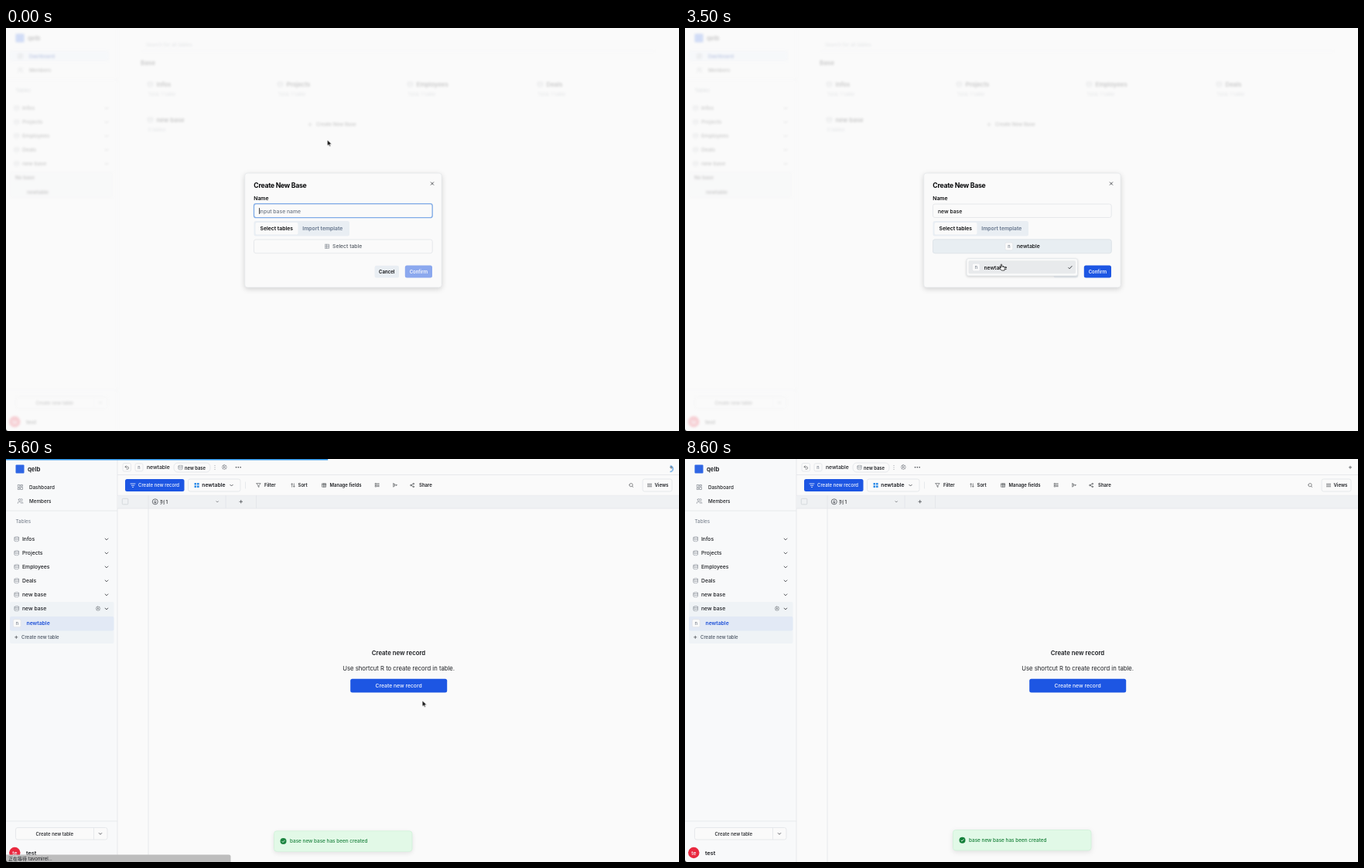
Write an HTML page that moves like this. It is 870 px wide and 522 px high and loops after 8.7 s.

```html
<!DOCTYPE html>
<html lang="en">
<head>
<meta charset="utf-8">
<title>Create New Base</title>
<style>
html, body { margin: 0; width: 100%; height: 100%; overflow: hidden; background: #fafafa; }
svg { display: block; width: 100%; height: 100%; color: #1d1f23; }
text { font: 500 6.8px Inter, "Noto Sans CJK SC", "Noto Sans CJK", sans-serif; dominant-baseline: central; fill: currentColor; white-space: pre; }
.s { font-size: 6px; }
.m { font-size: 6.3px; }
.b { font-weight: 600; }
.r { font-weight: 400; }
.mid { text-anchor: middle; }
.w { fill: #f4f7ff; }
.g { fill: #6d7683; }
.i { fill: none; stroke: #33363b; stroke-width: 2; stroke-linecap: round; stroke-linejoin: round; }
.gi { stroke: #7b818a; }
.box { fill: #fafafa; stroke: #e1e4e8; stroke-width: .8; }
.line { stroke: #e2e5e9; stroke-width: .8; fill: none; }
.blue { fill: #1d56e3; }

.k { animation: 8.7s step-end infinite; }
.fade { animation-timing-function: linear; }
#dash { opacity: .2; filter: blur(1.8px); }
#dash .g { opacity: .7; }
#dialog, #dash { color: #08090b; }
#dialog { animation-name: dialog; }
#page { animation-name: page; }
#ring { animation-name: ring; }
#hover { animation-name: hover; }
#pick { animation-name: pick; }
.chosen { animation-name: chosen; }
#popup { animation-name: popup; }
#press { animation-name: press; }
#toast { animation-name: toast; animation-timing-function: ease; }
#load { animation-name: load; }
#bar { animation-name: bar; animation-timing-function: ease-out; }
#spin { animation: spin .4s linear infinite; }
#status { animation-name: status; }
#cursor { animation-name: move; animation-timing-function: ease-in-out; }
#arrow { animation-name: arrow; }
#beam { animation-name: beam; }
#hand { animation-name: hand; }

@keyframes dialog { 0%, 63.218% { opacity: 1 } 64.368%, 100% { opacity: 0 } }
@keyframes page { 0%, 63.218% { opacity: 0 } 64.368%, 100% { opacity: 1 } }
@keyframes ring { 0% { opacity: 1 } 26.437%, 100% { opacity: 0 } }
@keyframes hover { 0% { opacity: 0 } 25.287% { opacity: 1 } 48.276%, 100% { opacity: 0 } }
@keyframes pick { 0% { opacity: 1 } 36.782%, 100% { opacity: 0 } }
@keyframes chosen { 0% { opacity: 0 } 36.782%, 100% { opacity: 1 } }
@keyframes popup { 0% { opacity: 0 } 27.011% { opacity: 1 } 48.276%, 100% { opacity: 0 } }
@keyframes press { 0% { opacity: 0 } 56.322%, 100% { opacity: 1 } }
@keyframes toast {
  0%, 60.92% { opacity: 0; transform: translateY(35px) }
  65.517%, 100% { opacity: 1; transform: none }
}
@keyframes load { 0% { opacity: 0 } 64.368% { opacity: 1 } 72.3%, 100% { opacity: 0 } }
@keyframes bar {
  0%, 63.218% { transform: scaleX(.1) }
  66.667% { transform: scaleX(.868) }
  70.69% { transform: scaleX(.93) }
  72%, 100% { transform: scaleX(1) }
}
@keyframes spin { to { transform: rotate(360deg) } }
@keyframes status { 0% { opacity: 0 } 64.368% { opacity: 1 } 73.5%, 100% { opacity: 0 } }
@keyframes move {
  0%, 13.793% { transform: translate(415.5px, 145px) }
  17.241%, 22.414% { transform: translate(394px, 244px) }
  26.437%, 29.885% { transform: translate(430px, 282px) }
  34.483%, 44.828% { transform: translate(409px, 306px) }
  48.851%, 52.874% { transform: translate(472px, 264px) }
  56.897%, 67.241% { transform: translate(538.3px, 313px) }
  72.989% { transform: translate(386px, 196px) }
  77.011%, 87.931% { transform: translate(377.5px, 185.3px) }
  92.5%, 100% { transform: translate(716px, 8px) }
}
@keyframes arrow {
  0% { opacity: 1 } 16.7% { opacity: 0 } 22.9% { opacity: 1 } 25.287% { opacity: 0 }
  48.276% { opacity: 1 } 56% { opacity: 0 } 63.218% { opacity: 1 } 92.5%, 100% { opacity: 0 }
}
@keyframes beam { 0% { opacity: 0 } 16.7% { opacity: 1 } 22.9%, 100% { opacity: 0 } }
@keyframes hand {
  0% { opacity: 0 } 25.287% { opacity: 1 } 48.276% { opacity: 0 } 56% { opacity: 1 } 63.218%, 100% { opacity: 0 }
}
</style>
</head>
<body>
<svg viewBox="0 0 870 522">
<defs>
  <symbol id="db" viewBox="0 0 24 24"><path class="i gi" d="M3 5c0-4 18-4 18 0s-18 4-18 0v14c0 4 18 4 18 0V5M3 12c0 4 18 4 18 0"/></symbol>
  <symbol id="down" viewBox="0 0 24 24"><path class="i" style="stroke-width:3" d="M5 9l7 7 7-7"/></symbol>
  <symbol id="plus" viewBox="0 0 24 24"><path class="i" style="stroke-width:3" d="M12 4v16M4 12h16"/></symbol>
  <symbol id="gear" viewBox="0 0 24 24"><path class="i" style="stroke:#5d626a" d="M12 2l3 3 4 0 0 4 3 3-3 3 0 4-4 0-3 3-3-3-4 0 0-4-3-3 3-3 0-4 4 0zM9 12a3 3 0 1 0 6 0 3 3 0 1 0-6 0"/></symbol>
  <symbol id="tiles" viewBox="0 0 24 24"><path class="i gi" d="M3 3h7v8H3zM14 3h7v5h-7zM14 12h7v9h-7zM3 15h7v6H3z"/></symbol>
  <symbol id="people" viewBox="0 0 24 24"><path class="i gi" d="M2 21v-2a4 4 0 0 1 4-4h6a4 4 0 0 1 4 4v2M22 21v-2a4 4 0 0 0-3-4M16 3a4 4 0 0 1 0 8M5 7a4 4 0 1 0 8 0 4 4 0 1 0-8 0"/></symbol>
  <symbol id="cols" viewBox="0 0 24 24"><path class="i" d="M3 4h18v16H3zM3 9h18M9 4v16M15 4v16"/></symbol>
  <symbol id="grid" viewBox="0 0 24 24"><path class="i gi" d="M3 3h18v18H3zM3 9h18M3 15h18M10 3v18"/></symbol>
  <symbol id="funnel" viewBox="0 0 24 24"><path class="i" d="M2 3h20l-8 10v8l-4-2v-6z"/></symbol>
  <symbol id="sort" viewBox="0 0 24 24"><path class="i" d="M3 8l4-4 4 4M7 4v16M13 16l4 4 4-4M17 20V4"/></symbol>
  <symbol id="rowsize" viewBox="0 0 24 24"><path class="i" d="M3 4h6v6H3zM3 14h6v6H3zM13 5h8M13 9h8M13 15h8M13 19h8"/></symbol>
  <symbol id="colour" viewBox="0 0 24 24"><path class="i" d="M5 3v18M5 7h6v10H5M15 12h6M18 9l3 3-3 3"/></symbol>
  <symbol id="share" viewBox="0 0 24 24"><path class="i" d="M15 6.500L9 10.500M9 13.500l6 4"/><g class="i"><circle cx="18" cy="5" r="3"/><circle cx="6" cy="12" r="3"/><circle cx="18" cy="19" r="3"/></g></symbol>
  <symbol id="lens" viewBox="0 0 24 24"><path class="i" d="M3 11a8 8 0 1 0 16 0 8 8 0 1 0-16 0M17 17l5 5"/></symbol>
  <symbol id="menu" viewBox="0 0 24 24"><path class="i" d="M3 6h18M3 12h18M3 18h18"/></symbol>
  <symbol id="back" viewBox="0 0 24 24"><path class="i" d="M9 14L4 9l5-5M4 9h11a5 5 0 0 1 0 11h-4"/></symbol>
  <g id="tag"><rect class="box" x="-5" y="-5" width="10" height="10" rx="2"/><text class="s mid g" y=".2" style="font-size:5.500px">n</text></g>

  <g id="side">
    <rect x="12.500" y="7.500" width="11" height="11" rx="1" fill="#2f66e4"/>
    <text class="b" x="28" y="12.700" style="font-size:7.800px">qelb</text>
    <use href="#tiles" x="14.500" y="32.500" width="8" height="8"/>
    <use href="#people" x="14.500" y="50.500" width="8" height="8"/>
    <text class="m" x="30" y="36.500">Dashboard</text>
    <text class="m" x="30" y="54.500">Members</text>
    <text class="m r g" x="12.500" y="81">Tables</text>
    <g id="rows"></g>
    <path class="line" d="M144 0V522M0 67H144M0 469H144"/>
    <rect class="box" x="12.500" y="477.500" width="118.500" height="15.500" rx="2.500"/>
    <path class="line" d="M113.500 477.500v15.500"/>
    <text class="s mid" x="62.700" y="485.300">Create new table</text>
    <use href="#down" x="119" y="482.300" width="6" height="6"/>
    <circle cx="11.300" cy="510" r="7.200" fill="#e9293f"/>
    <text class="mid w" x="11.300" y="510.200">te</text>
    <text class="b" x="26" y="510.200" style="font-size:7.200px">test</text>
  </g>
</defs>

<rect width="870" height="522" fill="#fafafa"/>

<g id="dash">
  <rect x="5" y="29.500" width="128" height="13" rx="2" fill="#e6eefb"/>
  <rect x="5" y="186" width="133" height="34" rx="2" fill="#f0f2f4"/>
  <use href="#side"/>
  <text class="m" x="30" y="36.500" style="fill:#1d56e3">Dashboard</text>
  <text class="m b" x="12" y="194">No base</text>
  <text class="m b" x="27" y="212.500">newtable</text>
  <text class="m g" x="181" y="22">Search for all tables</text>
  <path class="line" d="M174 30H840"/>
  <text class="b" x="174" y="45" style="font-size:8px">Base</text>
  <g id="cards"></g>
  <use href="#plus" x="390" y="122" width="6" height="6"/>
  <text class="m" x="401" y="125">Create New Base</text>
</g>

<g id="page" class="k fade">
  <rect width="870" height="522" fill="#fafafa"/>
  <rect width="144" height="522" fill="#f8f9fa"/>
  <rect x="5" y="185" width="134.500" height="54" rx="2" fill="#eff3f6"/>
  <rect x="5" y="204" width="134.500" height="18.500" rx="2" fill="#e2e9f5"/>
  <use href="#side"/>
  <use href="#db" x="10" y="190" width="7.500" height="7.500"/>
  <text x="21" y="193.800">new base</text>
  <use href="#gear" x="115.500" y="190.200" width="7" height="7"/>
  <use href="#down" x="126.700" y="190.700" width="6.500" height="6.500"/>
  <use href="#tag" x="14.300" y="212.700"/>
  <text class="b" x="26.500" y="212.700" style="fill:#1d50d8">newtable</text>
  <use href="#plus" x="10.800" y="228.300" width="5" height="5"/>
  <text class="s" x="20" y="230.900" style="fill:#4b5563">Create new table</text>

  <path class="line" d="M144 20.500H870M144 47.300H870"/>
  <rect class="box" x="151" y="5.500" width="10.500" height="10.500" rx="2"/>
  <use href="#back" x="153" y="7.700" width="6.500" height="6.500"/>
  <use href="#tag" x="172" y="10.800"/>
  <text x="182" y="10.600">newtable</text>
  <rect class="box" x="217" y="5" width="47" height="12" rx="5"/>
  <use href="#db" x="222" y="7.500" width="7" height="7"/>
  <text class="b" x="231" y="11" style="font-size:5.800px">new base</text>
  <path d="M270 8v6" stroke="#8b9098" stroke-width=".8" stroke-dasharray="1 1.500"/>
  <use href="#gear" x="278.500" y="6.800" width="7.500" height="7.500"/>
  <g fill="#33363b"><circle cx="297.500" cy="10.700" r=".8"/><circle cx="300.300" cy="10.700" r=".8"/><circle cx="303.100" cy="10.700" r=".8"/></g>
  <use href="#plus" x="857.500" y="8.300" width="5" height="5"/>

  <rect class="blue" x="154" y="26" width="76.500" height="16" rx="2.500"/>
  <path d="M161 32h6M162.300 34.300h3.500M163.500 36.500h1" stroke="#f4f7ff" stroke-width=".8" stroke-linecap="round"/>
  <text class="s w" x="171" y="33.900">Create new record</text>
  <rect class="box" x="235.500" y="26" width="67.500" height="16" rx="2.500"/>
  <path d="M243.500 31h2.600v2.600h-2.600zM247 31h2.600v2.600h-2.600zM243.500 34.500h2.600v2.600h-2.600zM247 34.500h2.600v2.600h-2.600z" fill="#2d8be8"/>
  <text class="b" x="253.300" y="33.900">newtable</text>
  <use href="#down" x="288.500" y="31" width="6" height="6"/>
  <path class="line" d="M309.500 29.500v9"/>
  <g id="tools"></g>
  <use href="#rowsize" x="476.500" y="30.500" width="6.500" height="6.500"/>
  <use href="#colour" x="499.500" y="30.500" width="6.500" height="6.500"/>
  <use href="#lens" x="805" y="30.700" width="6.500" height="6.500"/>
  <rect class="box" x="823" y="26" width="38" height="16" rx="2.500"/>
  <use href="#menu" x="828.500" y="30.500" width="7" height="7"/>
  <text class="s b" x="838.500" y="33.900">Views</text>

  <rect x="144.400" y="47.500" width="725.600" height="16.500" fill="#eff1f3"/>
  <path class="line" d="M144 64H870M184 47V522M284 47V64M323.500 47V64"/>
  <rect x="150.300" y="51.300" width="7.500" height="7.500" rx="1" fill="none" stroke="#cfd3d8" stroke-width=".8"/>
  <circle cx="192.800" cy="55.300" r="3.500" fill="none" stroke="#4b4f55" stroke-width=".8"/>
  <path d="M192.800 53.300v3.800M191.300 55.700l1.500 1.500 1.500-1.500" fill="none" stroke="#4b4f55" stroke-width=".9"/>
  <text class="s" x="199" y="55.300">列 1</text>
  <use href="#down" x="271" y="53" width="4.500" height="4.500"/>
  <use href="#plus" x="301" y="52.500" width="5.500" height="5.500"/>

  <text class="b mid" x="507.500" y="251" style="font-size:7.800px">Create new record</text>
  <text class="r mid" x="507.700" y="271" style="font-size:7.700px">Use shortcut R to create record in table.</text>
  <rect class="blue" x="445.200" y="284.700" width="125" height="17.700" rx="2.500"/>
  <text class="w mid" x="507.600" y="293.800">Create new record</text>

  <g id="load" class="k">
    <rect id="bar" class="k" width="870" height="1.500" fill="#2891e6"/>
    <g transform="translate(858.500 12.700)"><path id="spin" d="M0 -3.700A3.700 3.700 0 0 1 0 3.700" fill="none" stroke="#2b86dc" stroke-width="1.100"/></g>
  </g>
  <g id="status" class="k">
    <path d="M0 512.500H288a2.500 2.500 0 0 1 2.500 2.500V522H0z" fill="#bdbdbd"/>
    <text class="s r" x="3" y="517.700">正在等待 tavomirel...</text>
  </g>
</g>

<g id="dialog" class="k fade">
  <rect x="308.700" y="188" width="254.500" height="148" rx="3.500" fill="#fafafa" stroke="#e3e5e8" stroke-width=".7" style="filter:drop-shadow(0 2px 3px rgba(0,0,0,.16))"/>
  <text x="320.300" y="204" style="font-size:8.700px;font-weight:700;letter-spacing:-.28px">Create New Base</text>
  <path d="M549 199.500l4 4M553 199.500l-4 4" stroke="#44474c" stroke-width=".9"/>
  <text class="b" x="320.300" y="220.300">Name</text>
  <rect class="box" x="320.500" y="228" width="230.700" height="17.500" rx="2.500"/>
  <rect id="ring" class="k" x="320.500" y="227.700" width="230.700" height="18" rx="2.700" fill="none" stroke="#7fabe8" stroke-width="1.300"/>
  <text id="hint" class="g" x="327" y="237">Input base name</text>
  <text id="name" x="327" y="237"></text>
  <rect id="caret" x="327" y="233" width=".8" height="8" fill="#222"/>
  <rect x="320.500" y="250" width="123.500" height="19.500" rx="2.500" fill="#e9eef3"/>
  <rect x="322.500" y="252" width="55" height="15.500" rx="2" fill="#fafafa"/>
  <text class="b" x="328.500" y="259.800">Select tables</text>
  <text class="b" x="383.300" y="259.800" style="fill:#64748b">Import template</text>
  <rect class="box" x="320.500" y="274" width="230.700" height="17.700" rx="2.500"/>
  <rect id="hover" class="k" x="320.500" y="274" width="230.700" height="17.700" rx="2.500" fill="#e8eef2" stroke="#dce2e8" stroke-width=".8"/>
  <g id="pick" class="k">
    <use href="#grid" x="411.500" y="279.300" width="7" height="7"/>
    <text x="422" y="282.900" style="fill:#565d66">Select table</text>
  </g>
  <g class="k chosen">
    <use href="#tag" x="418.800" y="282.900"/>
    <text x="429" y="282.900">newtable</text>
  </g>
  <rect x="476.500" y="307.800" width="31.500" height="15.700" rx="2.500" fill="#e9eef3"/>
  <text class="s b mid" x="492.200" y="315.800">Cancel</text>
  <g id="confirm">
    <rect class="blue" x="515.800" y="307.600" width="35.200" height="16" rx="2.500"/>
    <rect id="press" class="k" x="515.800" y="307.600" width="35.200" height="16" rx="2.500" fill="#3061e1"/>
    <text class="s b w mid" x="533.400" y="315.800">Confirm</text>
  </g>
  <g id="popup" class="k">
    <rect x="364" y="298.700" width="143.500" height="22.300" rx="2.500" fill="#fafafa" stroke="#dfe2e6" stroke-width=".7" style="filter:drop-shadow(0 1px 1.500px rgba(0,0,0,.16))"/>
    <rect x="366.500" y="301.300" width="138.500" height="17" rx="2" fill="#e8eaec"/>
    <use href="#tag" x="376.300" y="310"/>
    <text x="386.500" y="310">newtable</text>
    <path class="k chosen" d="M495.500 310.200l1.600 1.600 3.200-3.600" fill="none" stroke="#2c2f33" stroke-width=".9"/>
  </g>
</g>

<g id="toast" class="k">
  <rect x="346.500" y="480.500" width="178.500" height="26.500" rx="3.500" fill="#e1f9e7" stroke="#ccefd6" stroke-width=".7" style="filter:drop-shadow(0 2px 3px rgba(0,0,0,.1))"/>
  <circle cx="358.500" cy="493.700" r="4" fill="#14803a"/>
  <path d="M356.700 493.800l1.300 1.300 2.400-2.600" fill="none" stroke="#e1f9e7" stroke-width=".9"/>
  <text x="367" y="493.700" style="font-size:6.400px;fill:#178039">base new base has been created</text>
</g>

<path d="M0 518.500Q0 522 3 522H0z" fill="#111"/>

<g id="cursor" class="k">
  <path id="arrow" class="k" d="M0 0V7.400L1.700 5.900 2.900 8.500 4.100 8 3 5.400H5.300z" fill="#111" stroke="#fff" stroke-width=".5"/>
  <path id="beam" class="k" d="M-1.700 -4.300Q0 -4.300 0 -3V3Q0 4.300 -1.700 4.300M1.700 -4.300Q0 -4.300 0 -3M0 3Q0 4.300 1.700 4.300M-1 1.200H1" fill="none" stroke="#222" stroke-width=".8"/>
  <path id="hand" class="k" d="M-.7 .3Q0 -.6 .7 .3V3L4 3.600Q4.900 3.900 4.700 5.200L4 8H.2L-2.500 5Q-2.300 3.800 -.7 5z" fill="#fff" stroke="#222" stroke-width=".8" stroke-linejoin="round"/>
</g>
</svg>
<script>
const $ = id => document.getElementById(id);
const icon = (id, x, y, size) => `<use href="#${id}" x="${x - size / 2}" y="${y - size / 2}" width="${size}" height="${size}"/>`;
const label = (cls, x, y, str) => `<text class="${cls}" x="${x}" y="${y}">${str}</text>`;
const bases = ['Infos', 'Projects', 'Employees', 'Deals', 'new base'];

$('rows').innerHTML = bases.map((name, i) => {
  const y = 103.8 + i * 18;
  return icon('db', 13.7, y, 7.5) + label('', 21, y, name) + icon('down', 130, y, 6.5);
}).join('');

$('cards').innerHTML = bases.map((name, i) => {
  const x = 186.5 + i % 4 * 168, y = i < 4 ? 73 : 119;
  return icon('db', x, y, 8) + `<text class="b" x="${x + 8}" y="${y}" style="font-size:7.8px">${name}</text>` +
    label('s g', x - 3, y + 12.5, i < 4 ? 'Total: 1 table' : '0 tables');
}).join('');

$('tools').innerHTML = [['funnel', 326.5, 'Filter', 334], ['sort', 371, 'Sort', 377.5],
  ['cols', 411.3, 'Manage fields', 418.5], ['share', 525, 'Share', 534]]
  .map(([id, x, str, tx]) => icon(id, x, 34, 6.5) + label('s b', tx, 33.9, str)).join('');

// Typing: one letter each 100 ms from 500 ms on
const word = 'new base';
let start, shown = -1;
function tick(now) {
  start ??= now;
  const t = (now - start) % 8700;
  const n = Math.max(0, Math.min(word.length, Math.floor((t - 400) / 100)));
  if (n !== shown) {
    shown = n;
    $('name').textContent = word.slice(0, n);
    $('hint').setAttribute('opacity', n ? 0 : 1);
    $('confirm').setAttribute('opacity', n ? 1 : .5);
    $('caret').setAttribute('x', 327 + $('name').getComputedTextLength());
  }
  $('caret').setAttribute('opacity', t < 1800 ? 1 : 0);
  requestAnimationFrame(tick);
}
requestAnimationFrame(tick);
</script>
</body>
</html>
```
